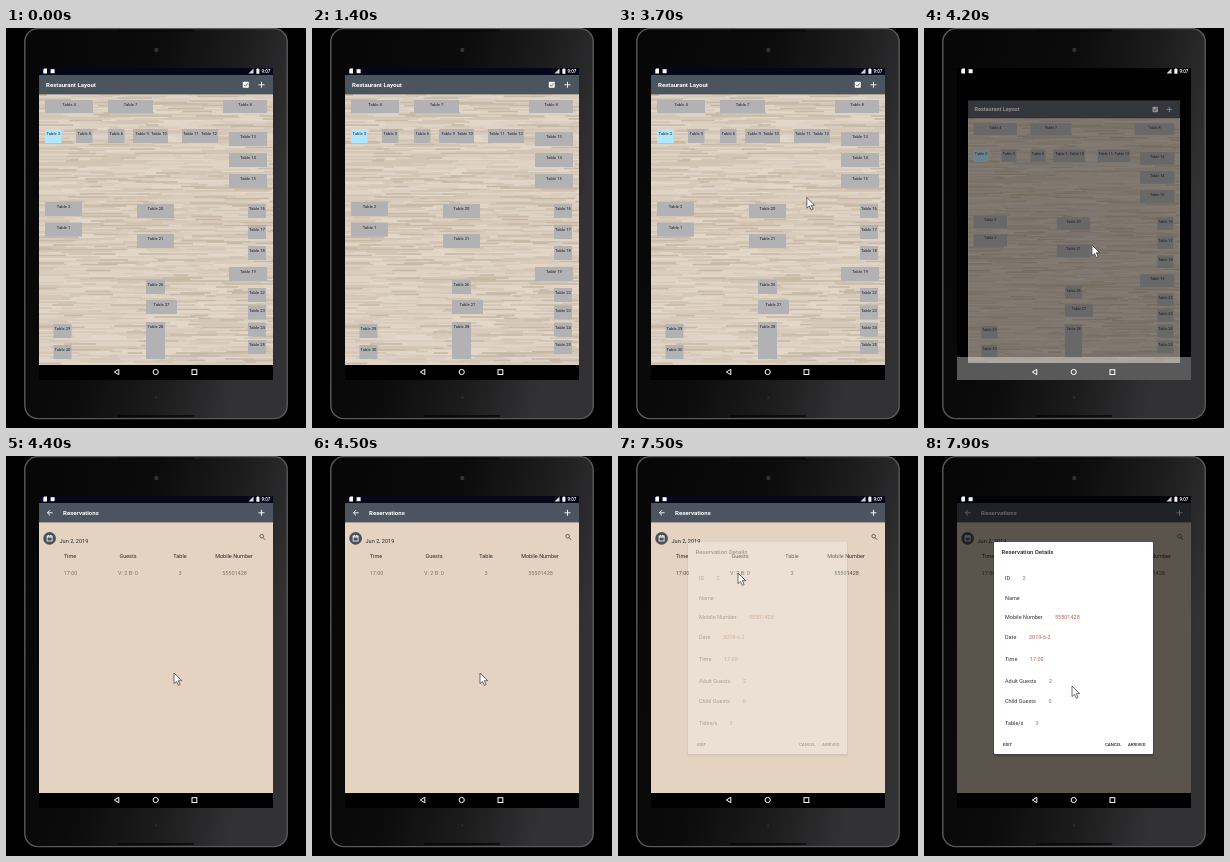
An HTML page for the animation above (8 s loop, 300x400 px).

```html
<!DOCTYPE html>
<html lang="en">
<head>
<meta charset="utf-8">
<title>Restaurant reservations</title>
<style>
  html, body { margin: 0; width: 100%; height: 100%; overflow: hidden; background: #000; }
  svg { display: block; width: 100vw; height: 100vh; font-family: Roboto, Arial, sans-serif; }
</style>
</head>
<body>
<svg id="stage" viewBox="0 0 300 400"></svg>
<script>
const LOOP = 8000, PHONE = '55501428';
const $ = id => document.getElementById(id);

const rect = (x, y, w, h, fill, extra = '') =>
  `<rect x="${x}" y="${y}" width="${w}" height="${h}" fill="${fill}" ${extra}/>`;
const text = (x, y, s, size, fill, extra = '') =>
  `<text x="${x}" y="${y}" font-size="${size}" fill="${fill}" ${extra}>${s}</text>`;
const line = (d, color = '#fff', width = 1) =>
  `<path d="${d}" fill="none" stroke="${color}" stroke-width="${width}"/>`;
const mid = 'text-anchor="middle"', bold = 'font-weight="500"';

const toolbar = (x, title) =>
  rect(33, 47, 234, 19, '#4b555f') + rect(33, 66, 234, 1, '#000', 'opacity=".25"') +
  text(x, 59, title, 6.1, '#fff', 'font-weight="700"') +
  line('M252.5 56.8h6M255.5 53.8v6', '#fff', .9);

// Planks of random length, one path per shade
function wood() {
  let seed = 7;
  const rnd = () => (seed = seed * 16807 % 2147483647) / 2147483647;
  const shades = ['#e2d7c9', '#d9ccbc', '#dfd3c5', '#d3c5b3', '#c8b9a6'];
  const paths = shades.map(() => '');
  for (let y = 67; y < 336; y += 1.5)
    for (let x = 33; x < 267;) {
      const w = Math.min(8 + rnd() * 36, 267 - x);
      paths[Math.floor(rnd() * 4.6)] += `M${x.toFixed(1)} ${y.toFixed(1)}h${w.toFixed(1)}`;
      x += w;
    }
  return rect(33, 66, 234, 271, '#dacdbd') +
    paths.map((d, i) => line(d, shades[i], 1.3)).join('');
}

const table = (n, x, y, w = 18, h = 14) =>
  rect(x, y, w, h, n === 3 ? '#b3e5fc' : '#b2b1b4') +
  text(x + w / 2, y + 6, 'Table ' + n, 4.2, '#1e1e22', mid);
const column = (x, w, spots) =>
  Object.entries(spots).map(([n, y]) => table(+n, x, y, w)).join('');
const row = (y, w, spots) =>
  Object.entries(spots).map(([n, x]) => table(+n, x, y, w)).join('');

const floor = wood() +
  table(4, 39, 72, 48, 13) + table(7, 102, 72, 45, 13) + table(8, 217, 72, 44, 13) +
  row(101, 16.5, { 3: 39, 5: 70, 6: 102 }) +
  row(101, 18, { 9: 127, 10: 144, 11: 176, 12: 194 }) +
  column(223, 38, { 13: 104, 14: 125, 15: 146, 19: 239 }) +
  column(242, 18, { 16: 176, 17: 197, 18: 218, 22: 260, 23: 277.5, 24: 294.5, 25: 312 }) +
  column(39, 37, { 2: 174, 1: 194.5 }) +
  column(131, 37, { 20: 176, 21: 206 }) +
  table(26, 140, 252, 19) + table(27, 140, 272, 31) + table(28, 140, 294, 19, 37) +
  column(47.5, 18, { 29: 296, 30: 317 }) +
  toolbar(40, 'Restaurant Layout') +
  rect(236.8, 53.8, 6, 6, '#fff', 'rx=".8"') + line('M238 56.8l1.4 1.4 2.4-2.8', '#4b555f', .9) +
  rect(33, 47, 234, 290, '#1a1716', 'id="shade"');

const heads = { Time: 64, Guests: 122, Table: 174, 'Mobile Number': 228 };
const cells = { '17:00': 64.5, 'V: 2 B: 0': 122, '3': 174, [PHONE]: 228.5 };
const cellRow = (items, y, fill) =>
  Object.entries(items).map(([s, x]) => text(x, y, s, 5.5, fill, mid)).join('');

const list = rect(33, 66, 234, 271, '#e3d3c0') +
  toolbar(57, 'Reservations') + line('M46.6 56.8h-5M44 54.2l-2.6 2.6 2.6 2.6', '#fff', .9) +
  '<circle cx="43.6" cy="82.4" r="6.3" fill="#48515c"/>' +
  rect(41.1, 80, 5, 5, 'none', 'stroke="#fff" stroke-width=".8"') +
  line('M41 81h5.2M42.4 79v1M44.8 79v1') +
  text(53.5, 87, 'Jun 2, 2019', 5.6, '#2c2926') +
  '<circle cx="255.7" cy="80.2" r="1.8" fill="none" stroke="#504943" stroke-width=".8"/>' +
  line('M257 81.6l2.2 2.2', '#504943', .9) +
  cellRow(heads, 102, '#2c2926') +
  `<g id="entry">${cellRow(cells, 119, '#2c2926')}</g>`;

const RED = '#b0604e', GREY = '#77777a';
const field = (y, label, x, value, color) =>
  text(81, y, label, 5.5, '#333') + text(x, y, value, 5.5, color);
const dialog =
  rect(69, 87, 161, 214, '#000', 'opacity=".10" rx="2"') +
  rect(69.5, 86.5, 160, 213, '#000', 'opacity=".14" rx="1.5"') +
  rect(70, 86, 159, 212, '#fff', 'rx="1"') +
  text(77.5, 98, 'Reservation Details', 6, '#222', bold) +
  field(124, 'ID', 98.5, '2', GREY) +
  field(143.5, 'Name', 105, '', GREY) +
  field(163, 'Mobile Number', 131, PHONE, RED) +
  field(183, 'Date', 105, '2019-6-2', RED) +
  field(205, 'Time', 106, '17:00', RED) +
  field(227, 'Adult Guests', 125, '2', GREY) +
  field(247, 'Child Guests', 124.5, '0', GREY) +
  field(269, 'Table/s', 111.5, '3', GREY) +
  text(79, 290, 'EDIT', 4.3, '#222', bold) +
  text(181, 290, 'CANCEL', 4.3, '#222', bold) +
  text(204, 290, 'ARRIVED', 4.3, '#222', bold);

const device =
  `<defs><linearGradient id="body" x2="1" y2=".35">
    <stop stop-color="#060606"/><stop offset=".45" stop-color="#0b0b0b"/>
    <stop offset=".75" stop-color="#1c1c1d"/><stop offset="1" stop-color="#323234"/>
  </linearGradient><clipPath id="screen">${rect(33, 40, 234, 312, '#000')}</clipPath></defs>` +
  rect(0, 0, 300, 400, '#000') +
  rect(18.8, .6, 262.4, 390, 'url(#body)', 'rx="13" stroke="#5a5a5c" stroke-width="1.4"') +
  '<circle cx="150.3" cy="22" r="2.2" fill="#303136"/>' +
  '<circle cx="150.3" cy="369.5" r="1.3" fill="#2a2a2c"/>' +
  line('M112 2.5h76M112 388h76', '#050505', 1.4) + rect(33, 40, 234, 312, '#000');

const status =
  '<path d="M37.3 41.5l1-1h2.7v5h-3.7z" fill="#fff"/>' +
  rect(44.6, 41.2, 4, 4, '#fff') +
  '<path d="M242.5 45.5l5-5v5z" fill="#fff" opacity=".85"/>' +
  rect(250.4, 41, 3, 4.8, '#fff', 'rx=".4"') + rect(251.2, 40.4, 1.4, 1, '#fff') +
  text(255.4, 45.3, '9:07', 4.6, '#fff', bold);

const nav = rect(33, 337, 234, 15, '#000') +
  rect(33, 329, 234, 23, '#fff', 'id="navGlow" opacity=".35"') +
  line('M112.8 341.3v5.4l-4.5-2.7z') +
  '<circle cx="149.7" cy="344" r="2.6" fill="none" stroke="#fff"/>' +
  rect(186, 341.7, 4.8, 4.8, 'none', 'stroke="#fff"');

$('stage').innerHTML = device +
  `<g clip-path="url(#screen)">
    ${rect(33, 40, 234, 7, '#05061a', 'id="statusBack"')}
    <g id="floor">${floor}</g><g id="list">${list}</g>
    ${rect(33, 40, 234, 297, '#000', 'id="dim"')}
    ${status}<g id="dialog">${dialog}</g>${nav}
  </g>
  <path id="cursor" d="M0 0v10.6l2.5-2.2 1.8 4 1.8-.8-1.8-3.9h3.4z" fill="#fff" stroke="#333" stroke-width=".7"/>`;

// Pointer stops: time, x, y
const stops = [
  [1300, 304, 285], [2200, 246, 70], [2400, 241, 51], [3150, 241, 51], [4000, 168, 217],
  [5400, 168, 217], [6300, 123.5, 119.5], [6600, 123.5, 119.5], [6900, 120, 117],
  [7500, 120, 117], [7850, 148, 230]
];
const ramp = (t, a, b) => Math.min(1, Math.max(0, (t - a) / (b - a)));
const smooth = k => k * k * (3 - 2 * k);

function pointer(t) {
  let [, x, y] = stops[0];
  for (let i = 1; i < stops.length; i++) {
    const k = smooth(ramp(t, stops[i - 1][0], stops[i][0]));
    x += (stops[i][1] - stops[i - 1][1]) * k;
    y += (stops[i][2] - stops[i - 1][2]) * k;
  }
  return `translate(${x} ${y})`;
}

const fade = (id, k) => $(id).setAttribute('opacity', k);
const show = (id, on) => $(id).setAttribute('visibility', on ? 'visible' : 'hidden');

function draw(now) {
  const t = Math.floor(now % LOOP / 100) * 100;
  const leave = ramp(t, 3950, 4200), open = ramp(t, 4200, 4400);
  const scale = 1 - .095 * leave;
  $('floor').setAttribute('transform',
    `translate(149.5 316) scale(${scale}) translate(-149.5 -316)`);
  fade('shade', .48 * leave);
  fade('statusBack', 1 - leave + open);
  show('floor', open < 1);
  fade('list', open);
  $('list').setAttribute('transform', `translate(0 ${12 * (1 - open)})`);
  show('navGlow', t >= 4100 && t < 4300);
  fade('entry', t < 7440 ? .55 : .8);
  fade('dialog', ramp(t, 7440, 7640));
  fade('dim', .6 * ramp(t, 7500, 7750));
  show('cursor', t >= 1400);
  $('cursor').setAttribute('transform', pointer(t));
}

const start = performance.now();
function tick() {
  draw(performance.now() - start);
  requestAnimationFrame(tick);
}
tick();
</script>
</body>
</html>
```
